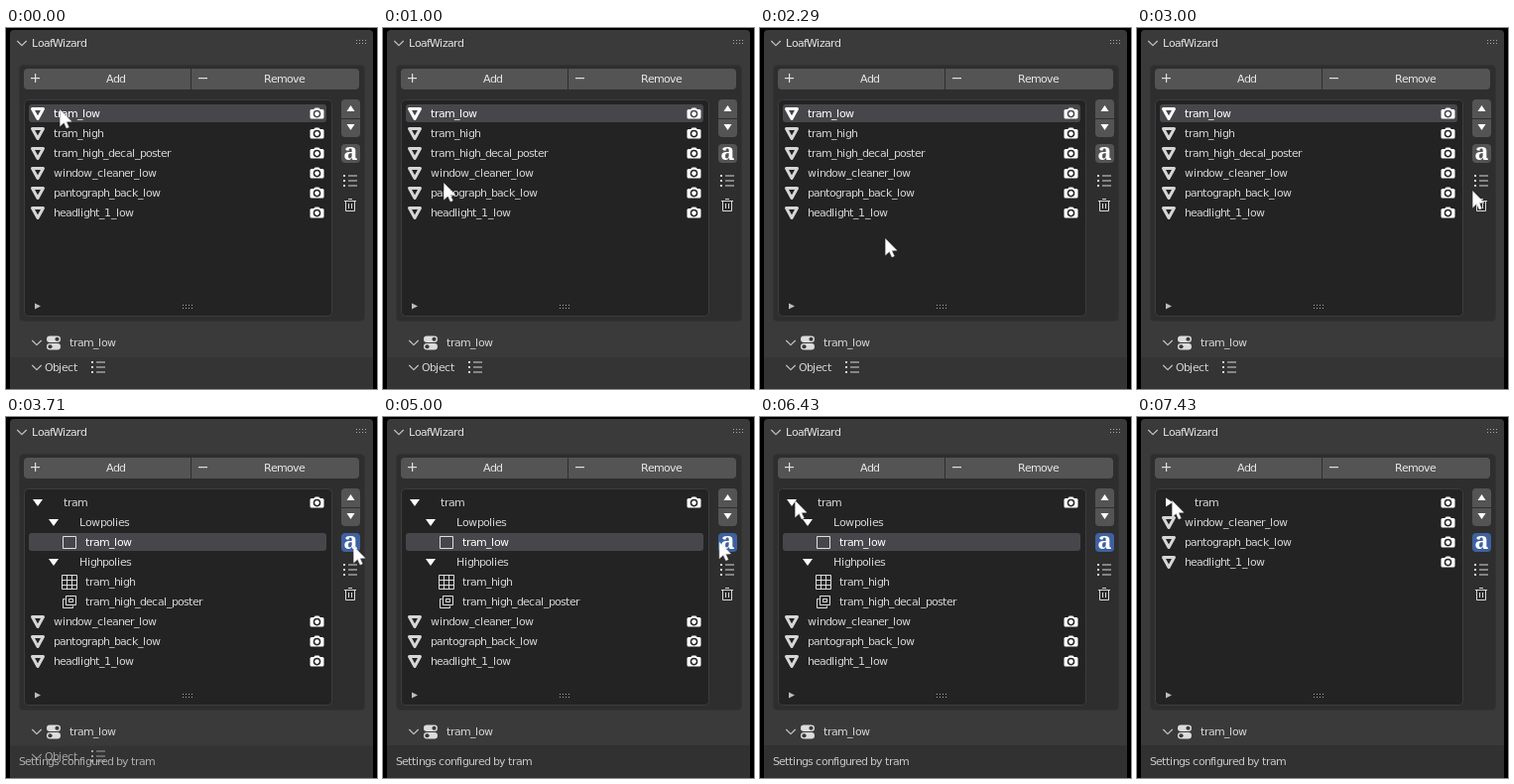
Write an HTML page with a canvas that moves like this. It is 374x364 px and loops after 8000 ms.

```html
<!DOCTYPE html>
<html lang="en">
<head>
<meta charset="utf-8">
<title>Object list</title>
<style>
html, body { margin: 0; width: 100%; height: 100%; overflow: hidden; background: #000; }
canvas { display: block; }
</style>
</head>
<body>
<canvas id="stage" width="374" height="364"></canvas>
<script>
const ctx = document.getElementById('stage').getContext('2d');
const LOOP = 8000, GROUP = 3640, COLLAPSE = 6700;
const LIGHT = '#d6d6d6', WHITE = '#fff';
const UI_FONT = '"DejaVu Sans", sans-serif';

// Mouse path: time, x, y of the tip
const PATH = [
  [0, 54, 82], [140, 55, 88], [1000, 61, 156], [1140, 61, 169], [1290, 63, 172],
  [2290, 126, 212], [2400, 126, 212], [2700, 240, 196], [3000, 338, 164],
  [3430, 349, 133], [3570, 350, 130], [4950, 350, 130], [5430, 243, 90],
  [6000, 75, 86], [6420, 35, 84], [LOOP, 35, 84]
];

// Rows: icon, label, camera shown
const LOOSE = ['window_cleaner_low', 'pantograph_back_low', 'headlight_1_low'].map(s => ['mesh', s, true]);
const FLAT = [
  ['mesh', 'tram_low', true], ['mesh', 'tram_high', true],
  ['mesh', 'tram_high_decal_poster', true], ...LOOSE
];
const OPEN = [
  ['open', 'tram', true], ['subOpen', 'Lowpolies'], ['square', 'tram_low'],
  ['subOpen', 'Highpolies'], ['grid', 'tram_high'], ['decal', 'tram_high_decal_poster'], ...LOOSE
];
const CLOSED = [['closed', 'tram', true], ...LOOSE];
const LABEL_X = { mesh: 48, open: 58, closed: 58, subOpen: 74, square: 80, grid: 80, decal: 80 };

const clamp = v => Math.max(0, Math.min(1, v));

function box(x, y, w, h, r, fill, line) {
  ctx.beginPath();
  ctx.roundRect(x, y, w, h, r);
  if (fill) { ctx.fillStyle = fill; ctx.fill(); }
  if (line) { ctx.strokeStyle = line; ctx.lineWidth = 1; ctx.stroke(); }
}

function shape(points, fill, line, width = 1, closed = true) {
  ctx.beginPath();
  points.forEach(([x, y]) => ctx.lineTo(x, y));
  if (closed) ctx.closePath();
  ctx.lineJoin = 'round';
  if (fill) { ctx.fillStyle = fill; ctx.fill(); }
  if (line) { ctx.strokeStyle = line; ctx.lineWidth = width; ctx.stroke(); }
}

function disc(x, y, r, fill) {
  ctx.beginPath();
  ctx.arc(x, y, r, 0, 7);
  ctx.fillStyle = fill;
  ctx.fill();
}

// Advances are cut to whole pixels, as the interface does
const advances = {};
function advance(ch) {
  if (!(ch in advances)) {
    ctx.font = '1100px ' + UI_FONT;
    advances[ch] = Math.floor(ctx.measureText(ch).width / 100 + 0.01);
  }
  return advances[ch];
}

function text(str, x, y, fill = LIGHT) {
  ctx.fillStyle = fill;
  for (const ch of str) {
    const step = advance(ch);
    ctx.font = '11px ' + UI_FONT;
    ctx.fillText(ch, x, y);
    x += step;
  }
}

function chevron(x, y) {
  shape([[x - 4.7, y - 2], [x, y + 2.6], [x + 4.7, y - 2]], null, '#c4c4c4', 1.2, false);
}

function grip(x, y) {
  ctx.fillStyle = '#a8a8a8';
  for (let i = 0; i < 8; i++) ctx.fillRect(x + (i % 4) * 3, y + (i >> 2) * 3, 1, 1);
}

function triangle(x, y, dir) {
  const p = { down: [[-5, -3], [5, -3], [0, 4]], up: [[-4, 3], [4, 3], [0, -3]], right: [[-3, -4.5], [4, 0], [-3, 4.5]] };
  shape(p[dir].map(([a, b]) => [x + a, y + b]), WHITE);
}

function listIcon(x, y) {
  ctx.fillStyle = '#d8d8d8';
  for (let i = 0; i < 3; i++) {
    ctx.fillRect(x, y + i * 5, 2, 2);
    ctx.fillRect(x + 5, y + i * 5 + 0.5, 9, 1);
  }
}

function camera(y, back) {
  box(310.5, y - 5.5, 6, 4, 1.5, WHITE);
  box(306.5, y - 4, 14, 9.5, 1.5, WHITE);
  disc(313.5, y + 0.6, 3.8, back);
  disc(313.5, y + 0.6, 2.3, WHITE);
}

function rowIcon(kind, y, tint) {
  ctx.strokeStyle = '#dedede';
  ctx.lineWidth = 1;
  if (kind === 'mesh') shape([[26.5, y - 4.5], [37.5, y - 4.5], [32, y + 5.5]], null, tint, 3);
  if (kind === 'open') triangle(32, y, 'down');
  if (kind === 'closed') triangle(32, y, 'right');
  if (kind === 'subOpen') triangle(48, y, 'down');
  if (kind === 'square') ctx.strokeRect(57.5, y - 5.5, 13, 12);
  if (kind === 'grid') {
    ctx.strokeRect(56.5, y - 6.5, 15, 14);
    ctx.beginPath();
    for (const d of [5, 10]) {
      ctx.moveTo(56.5 + d, y - 6.5); ctx.lineTo(56.5 + d, y + 7.5);
      ctx.moveTo(56.5, y - 6.5 + d); ctx.lineTo(71.5, y - 6.5 + d);
    }
    ctx.stroke();
  }
  if (kind === 'decal') {
    shape([[59.5, y - 2.5], [57.5, y - 2.5], [57.5, y + 6.5], [67.5, y + 6.5], [67.5, y + 4.5]], null, '#dedede', 1, false);
    ctx.strokeRect(60.5, y - 5.5, 10, 9);
    ctx.strokeRect(63.5, y - 2.5, 4, 3);
  }
}

function rows(list, active) {
  if (active >= 0) box(23, 77 + active * 20, 300, 18, 3, '#47474b');
  list.forEach(([kind, label, cam], i) => {
    const y = 86 + i * 20, on = i === active, tint = on ? WHITE : LIGHT;
    rowIcon(kind, y, tint);
    text(label, LABEL_X[kind], y + 4, tint);
    if (cam) camera(y, on ? '#47474b' : '#232323');
  });
}

function panel() {
  ctx.fillStyle = '#000';
  ctx.fillRect(0, 0, 374, 364);
  box(4, 2, 366, 370, 4, '#3a3a3a');
  ctx.fillStyle = '#343434';
  ctx.fillRect(4, 332, 366, 32);

  chevron(16, 15);
  text('LoafWizard', 26, 19, '#e4e4e4');
  grip(353, 12);

  box(13.5, 37.5, 348, 258, 4, '#2e2e2e', '#333');
  box(18, 41, 168, 21, [4, 0, 0, 4], '#545454');
  box(187, 41, 169, 21, [0, 4, 4, 0], '#545454');
  ctx.fillStyle = '#e0e0e0';
  ctx.fillRect(25, 50, 9, 1.2);
  ctx.fillRect(29, 46, 1.2, 9);
  ctx.fillRect(194, 50, 9, 1.2);
  text('Add', 101, 55, '#e8e8e8');
  text('Remove', 260, 55, '#e8e8e8');

  box(18.5, 72.5, 310, 218, 4, '#232323', '#3d3d3d');
  shape([[29, 277.5], [35, 280.5], [29, 283.5]], '#bdbdbd');
  grip(178, 279);

  chevron(31, 317);
  for (const [y, knob] of [[310.5, 51.5], [318, 44.5]]) {
    box(41, y, 14, 6.5, 3.2, '#dcdcdc');
    disc(knob, y + 3.25, 2.1, '#3a3a3a');
  }
  text('tram_low', 64, 321);
  chevron(31, 342);
  text('Object', 39, 346);
  listIcon(86, 336);
}

function sideButtons(pressed) {
  box(338, 72, 19, 19, [4, 4, 0, 0], '#545454');
  box(338, 92, 19, 18, [0, 0, 4, 4], '#545454');
  triangle(347.5, 81, 'up');
  shape([[343.5, 97], [351.5, 97], [347.5, 103]], WHITE);

  box(338, 117, 19, 19, 4, pressed ? '#3f619f' : '#545454');
  ctx.font = 'bold 24px "Noto Serif", serif';
  ctx.textAlign = 'center';
  ctx.fillStyle = WHITE;
  ctx.fillText('a', 347.5, 133);
  ctx.textAlign = 'left';

  listIcon(340, 148);
  ctx.strokeStyle = '#d8d8d8';
  ctx.lineWidth = 1;
  ctx.strokeRect(342.5, 174.5, 9, 10);
  ctx.fillStyle = '#d8d8d8';
  ctx.fillRect(341, 174, 12, 1);
  ctx.fillRect(345, 172, 4, 1);
  ctx.fillRect(345, 177, 1, 5);
  ctx.fillRect(348, 177, 1, 5);
}

function notice(t) {
  const age = t - 3570;
  if (age <= 0) return;
  ctx.globalAlpha = clamp(age / 430);
  ctx.fillStyle = '#313131';
  ctx.fillRect(4, 331, 366, 33);
  ctx.globalAlpha = clamp(age / 170);
  text('Settings configured by tram', 13, 351, '#c8c8c8');
  ctx.globalAlpha = 1;
}

function pointer(t) {
  const i = PATH.findIndex(p => p[0] > t);
  const [t0, x0, y0] = PATH[i - 1], [t1, x1, y1] = PATH[i];
  const k = (t - t0) / (t1 - t0);
  const x = x0 + (x1 - x0) * k, y = y0 + (y1 - y0) * k;
  const arrow = [[0.5, 0.5], [0.5, 17], [4.4, 13.4], [7, 19], [9.4, 18], [6.9, 12.5], [12, 12.2]];
  shape(arrow.map(([a, b]) => [x + a, y + b]), WHITE, '#d0d0d0', 0.5);
}

function draw(t) {
  panel();
  sideButtons(t >= GROUP);
  if (t < GROUP) rows(FLAT, 0);
  else if (t < COLLAPSE) rows(OPEN, 2);
  else rows(CLOSED, -1);
  notice(t);
  pointer(t);
}

const start = performance.now();
function tick() {
  draw((performance.now() - start) % LOOP);
  requestAnimationFrame(tick);
}
tick();
</script>
</body>
</html>
```
